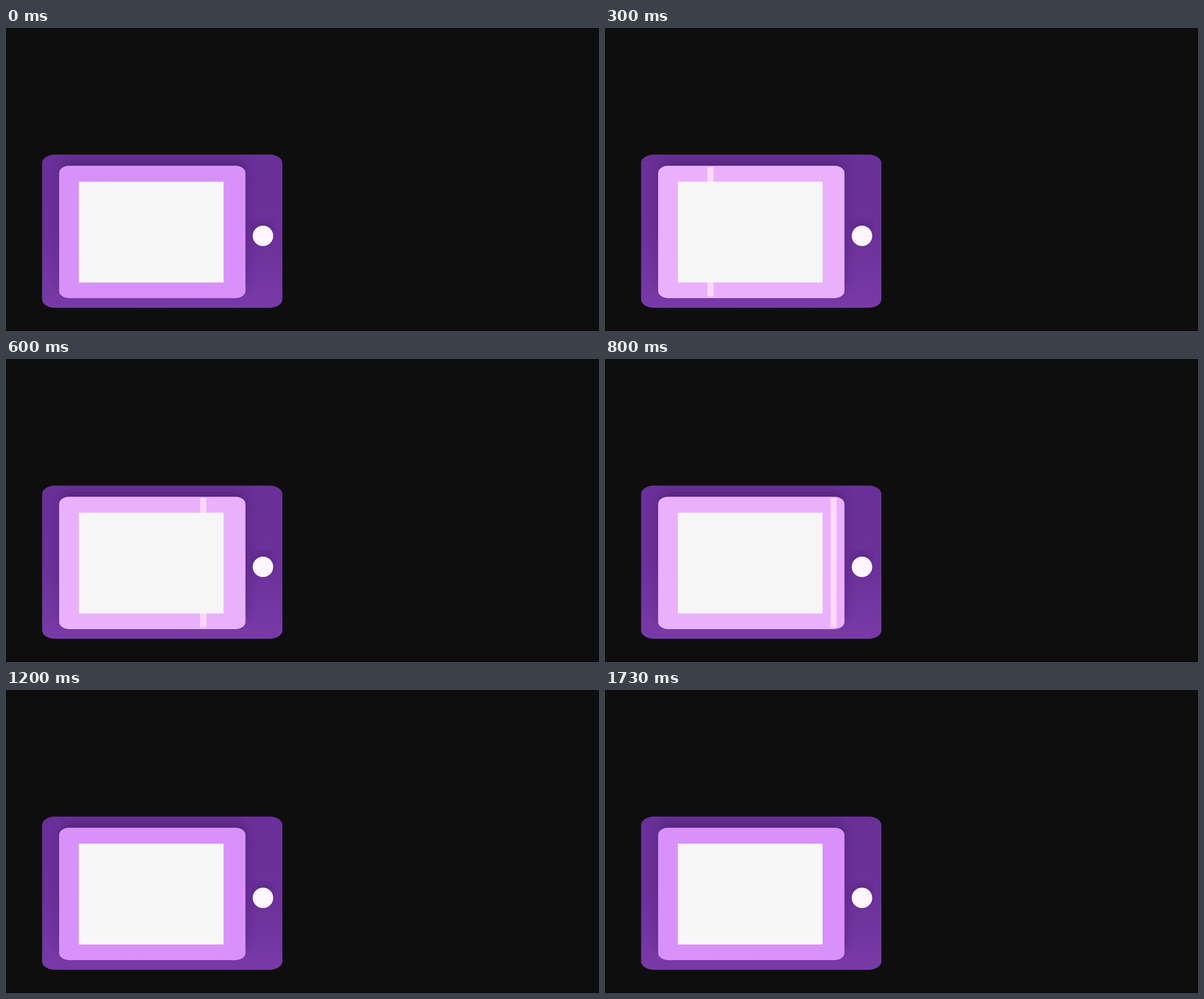
These frames come from a looping animation (1047x535 px, 2070 ms). An HTML page without scripts:

```html
<!DOCTYPE html>
<html lang="en">
<head>
<meta charset="utf-8">
<title>Tablet sweep</title>
<style>
  html, body { margin: 0; width: 100%; height: 100%; overflow: hidden; background: #0e0e0e; }
  svg { display: block; width: 100%; height: 100%; }

  .panel, .screen, .bar, .button { animation: 2070ms step-end infinite; }
  .panel { fill: #d891f8; animation-name: glow; }
  .screen { fill: #f7f7f7; animation-name: dim; }
  .bar { fill: #ffd9fa; animation-name: sweep; }
  .button { fill: #fff5fe; animation-name: press; }

  @keyframes glow {
    1.44% { fill: #ebb0fc; }
    43.47% { fill: #d891f8; }
  }
  @keyframes dim {
    1.44% { fill: #f6f6f6; }
    43.47% { fill: #f7f7f7; }
  }
  @keyframes press {
    72.46% { fill: #ebb0fc; }
    83.57% { fill: #fff5fe; }
  }
  /* eased travel, held on each tick */
  @keyframes sweep {
    0% { transform: translateX(107px); opacity: 0; }
    1.44% { transform: translateX(107px); opacity: 1; }
    4.83% { transform: translateX(111px); opacity: 1; }
    6.28% { transform: translateX(115px); opacity: 1; }
    9.66% { transform: translateX(138px); opacity: 1; }
    11.11% { transform: translateX(150px); opacity: 1; }
    14.49% { transform: translateX(181px); opacity: 1; }
    15.94% { transform: translateX(197px); opacity: 1; }
    19.32% { transform: translateX(236px); opacity: 1; }
    20.77% { transform: translateX(253px); opacity: 1; }
    24.15% { transform: translateX(292px); opacity: 1; }
    25.6% { transform: translateX(309px); opacity: 1; }
    28.98% { transform: translateX(343px); opacity: 1; }
    30.43% { transform: translateX(355px); opacity: 1; }
    33.81% { transform: translateX(379px); opacity: 1; }
    35.26% { transform: translateX(387px); opacity: 1; }
    38.64% { transform: translateX(398.4px); opacity: 1; }
    57.97%, 100% { transform: translateX(398.4px); opacity: 0; }
  }
</style>
</head>
<body>
<svg viewBox="0 0 1047 535" preserveAspectRatio="none">
  <defs>
    <linearGradient id="case" x1="0" y1="0" x2="0" y2="1">
      <stop offset="0" stop-color="#6a3099"/>
      <stop offset=".5" stop-color="#6b3099"/>
      <stop offset="1" stop-color="#783aa8"/>
    </linearGradient>
    <filter id="soft" x="-20%" y="-20%" width="140%" height="140%">
      <feGaussianBlur stdDeviation="8"/>
    </filter>
    <clipPath id="edge">
      <rect x="63.7" y="223.5" width="424.3" height="270.5" rx="22" ry="15"/>
    </clipPath>
  </defs>
  <rect y="534" width="1047" height="1" fill="#050505"/>
  <g clip-path="url(#edge)">
    <rect x="63" y="223" width="426" height="272" fill="url(#case)"/>
    <rect x="96" y="234" width="328" height="228" rx="18" fill="#48206f" opacity=".65" filter="url(#soft)"/>
    <ellipse cx="453.5" cy="358" rx="16" ry="15" fill="#48206f" opacity=".6" filter="url(#soft)"/>
  </g>
  <rect class="panel" x="93.8" y="243.3" width="329" height="233.6" rx="17" ry="13"/>
  <rect class="bar" y="245.5" width="10.7" height="228.5"/>
  <rect class="screen" x="128.7" y="271.4" width="255.5" height="177.9"/>
  <circle class="button" cx="453.7" cy="367" r="18.1"/>
</svg>
</body>
</html>
```
